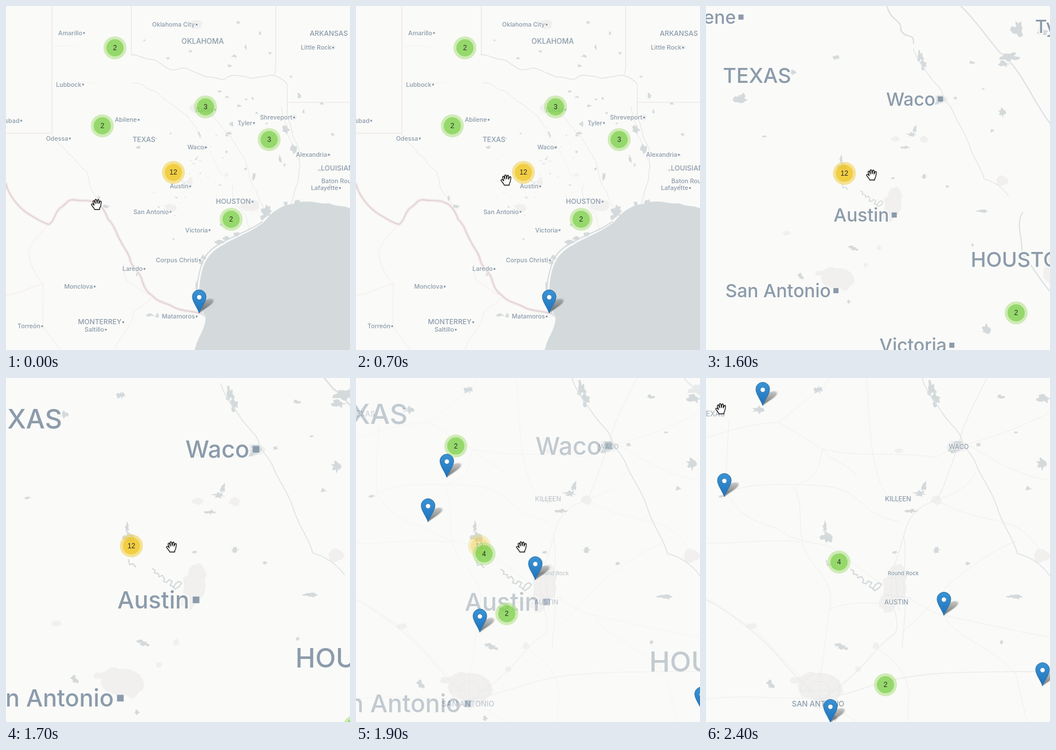
An HTML page that plays this animation: 600x600 px, repeating every 2500 ms.

```html
<!DOCTYPE html>
<html lang="en">
<head>
<meta charset="utf-8">
<title>Clustered map</title>
<style>
html, body { margin: 0; width: 100%; height: 100%; overflow: hidden; background: #fafaf8; }
svg { display: block; width: 100vw; height: 100vh; }
text { font-family: Inter, sans-serif; font-weight: 500; fill: #8b9bab; }
.halo text { paint-order: stroke; stroke: #fafaf8; stroke-width: 1.6px; stroke-linejoin: round; }
.count { font: 12px "Liberation Sans", Arial, sans-serif; fill: #2b2b2b; text-anchor: middle; }
.line { fill: none; stroke-linejoin: round; stroke-linecap: round; }
</style>
</head>
<body>
<svg viewBox="0 0 600 600">
  <defs>
    <linearGradient id="blue" x1="0" y1="0" x2="0" y2="1">
      <stop offset="0" stop-color="#3a94d4"/><stop offset="1" stop-color="#1f72bb"/>
    </linearGradient>
    <linearGradient id="shade" x1="0" y1="1" x2="0" y2="0">
      <stop offset="0" stop-color="#000" stop-opacity=".55"/><stop offset="1" stop-color="#000" stop-opacity=".2"/>
    </linearGradient>
    <filter id="soft" x="-30%" y="-30%" width="160%" height="160%"><feGaussianBlur stdDeviation="1.6"/></filter>
    <path id="drop" d="M0 0C-3-9-12-20-12-28.500A12 12 0 0 1 12-28.500C12-20 3-9 0 0Z"/>
    <g id="pin">
      <use href="#drop" transform="skewX(-38) scale(.8 .62)" fill="url(#shade)" filter="url(#soft)"/>
      <use href="#drop" fill="url(#blue)" stroke="#2a6ea6" stroke-width="1"/>
      <circle cy="-27.500" r="4.200" fill="#fff" stroke="#2a6ea6" stroke-width=".6"/>
    </g>
    <path id="open" fill="#fff" stroke="#111" stroke-width="1.350" stroke-linejoin="round" stroke-linecap="round"
      d="M-3.500 9C-4 6-8 3-9 .8C-9.300-1-7-1.600-5.500.2L-4.300 1.500L-6.300-4.500C-6.600-6.600-4.500-7.200-3.700-5.300L-2.200-1.500L-2.700-7.200C-2.700-9.300-.2-9.300.1-7.200L.8-1.800L1.600-7C2-8.900 4.300-8.600 4.200-6.500L4-1.300L5.700-4.900C6.600-6.500 8.600-5.700 8.100-3.800C7.300-.5 8 3.300 5.500 6.200L5.200 9Z"/>
    <path id="point" fill="#0a0a0a" stroke="#fff" stroke-width=".8" stroke-linejoin="round"
      d="M-4-8C-2.800-8.900-1.400-8-1.300-6.600L-.9-3C.5-4 1.700-3.500 2-2.400C3.300-3.100 4.500-2.500 4.700-1.400C6.300-2 7.500-1 7.400.6C7.300 3 6.700 4 6 5.300V8H-2.500V5.800L-7 1.800C-8.200.3-6.600-1.100-5.200-.2L-3.800.8L-4.600-6.300Z"/>
  </defs>
  <rect width="600" height="600" fill="#fafaf8"/>
  <g id="far"></g>
  <g id="near"></g>
  <polygon id="hull" points="264,199 278,203 342,321 327,355 293,368 246,269"
    fill="#3388ff" fill-opacity=".2" stroke="#3388ff" stroke-width="3" stroke-linejoin="round"/>
  <g id="marks"></g>
  <use id="cursor"/>
</svg>
<script>
const WATER = '#d4dadc', LAND = '#fafaf8', TOWN = '#f1f0ef';
const CX = 317.6, CY = 289.3, ZOOM = 4;
const $ = id => document.getElementById(id);

let seed = 11;
const rand = () => (seed = seed * 16807 % 2147483647) / 2147483647;

const line = (d, color, width) =>
  `<path class="line" d="${d}" stroke="${color}" stroke-width="${width}"/>`;

// Ragged outline around an ellipse
function blob(x, y, w, h, fill, low = .3) {
  const n = 16;
  let d = '';
  for (let i = 0; i < n; i++) {
    const a = i / n * Math.PI * 2, r = low + (1 - low) * rand();
    d += `${i ? 'L' : 'M'}${(x + Math.cos(a) * w / 2 * r).toFixed(1)} ${(y + Math.sin(a) * h / 2 * r).toFixed(1)}`;
  }
  return `<path d="${d}Z" fill="${fill}"/>`;
}
const blobs = (list, fill, low) =>
  list.trim().split(/\s+/).map(s => blob(...s.split(',').map(Number), fill, low)).join('');

// Lakes and towns shared by both zoom levels, in close-up coordinates
const towns = blobs(`195,538,84,60 180,530,50,40 215,545,50,50 328,365,44,78 335,345,34,50 318,392,34,40
  402,213,22,18 296,467,14,14 336,127,18,10 437,120,44,24 80,433,22,12 585,310,34,26 265,508,12,12
  335,212,24,14 155,528,18,14`, TOWN, .7);
const creek = 'M253 334l5 3-1 5 7 1 1 6 6-3 4 6-2 5 6 2 4-5 6 3-4 7 7 3 3-6 6-4 5 3-4 6-8 5-4-4M210 318l2 9 6-2 5 6';
const lakes = blobs(`196,20,18,20 93,56,28,18 392,18,24,36 400,38,18,30 440,118,32,22 432,127,26,12
  373,201,30,16 380,187,12,24 359,232,30,9 402,300,18,12 207,260,10,30 210,278,26,28 237,470,26,14 231,466,18,8
  112,535,18,20 540,381,36,12 586,150,26,30 516,461,9,9 590,36,34,20 514,33,20,9 562,193,12,10
  456,324,11,8 330,304,14,6 475,116,12,8 541,95,9,5 28,206,18,6 225,594,14,12`, WATER)
  + line(creek, WATER, 2.2)
  + line('M377 0C382 20 397 38 413 62S442 90 446 108C452 126 464 132 471 150C480 175 500 197 510 232C520 262 537 280 543 306C566 312 586 326 600 345', '#dfe3e5', 1.6);

const bigLabel = (name, x, y, size = 12.1) =>
  `<text x="${x}" y="${y + 4.3}" font-size="${size}" font-weight="600" text-anchor="middle">${name}</text>`;
const dot = (x, y) => `<rect x="${x - 1.5}" y="${y - 1.5}" width="3" height="3" fill="#8b9bab"/>`;
const city = (name, x, y, size = 10.7) =>
  `<text x="${x - 3}" y="${y + 3.8}" font-size="${size}" text-anchor="end">${name}</text>` + dot(x, y);

function farMap() {
  const pink = '#efdddd', river = '#dde1e3';
  const rio = 'M0 310C4 328 18 347 35 360C50 369 62 378 75 381C86 374 84 360 95 352C106 346 106 337 118 338C132 341 145 337 155 343C168 347 174 360 178 372C190 382 192 398 200 410C206 424 216 432 217 445C222 459 232 463 236 474C240 488 243 497 256 506C266 518 283 518 294 526C310 534 328 531 345 538';
  const coast = 'M600 353C589 347 577 351 564 344C549 346 540 341 524 341C508 341 499 347 488 347C474 354 466 358 456 370C447 380 438 384 425 393C406 402 394 405 380 416C362 425 352 436 346 450C340 464 337 482 337 500C337 516 341 530 348 544C348 560 338 574 333 587L329 600';
  return blobs('350,178,34,26 328,178,18,20 425,347,38,28 332,32,24,20 570,72,14,10 502,194,14,12 563,260,10,8', TOWN, .7)
    + line('M65 485L64 560L95 600M75 381C60 396 46 410 39 428C42 450 50 470 65 485M205 450C211 462 200 473 214 481C228 488 236 500 256 506M190 600C196 575 222 560 222 535C236 520 246 522 256 506M0 505C30 500 40 490 65 485', '#f5e9e8', 1)
    + line('M80 0V222H0', pink, 1)
    + line('M218.500 0V85M470.500 0V110L468 119M490.500 136V168H600', '#e7e1e2', 1)
    + line('M218 85C229 84 240 92 250 93C264 91 272 106 287 111C300 114 305 104 317 110C330 116 339 119 350 124C363 121 372 131 383 127C394 116 406 123 418 123C432 130 440 122 452 123C462 117 480 123 490 136', '#dfdfe1', 1.2)
    + line('M490.500 168V195C500 209 497 226 507 240C515 254 509 267 513 279C509 291 513 302 506 315C501 329 502 337 496 347', '#dfdfe1', 1)
    + line('M80 224C88 240 101 244 108 257C124 266 124 280 139 287C148 302 142 318 157 331L168 346', river, .8)
    + line('M222 135C237 131 243 145 255 147C266 149 274 164 286 169C298 177 305 184 317 192C319 201 326 200 325 206C328 212 333 207 332.500 214', river, .8)
    + line('M396.500 313C392 321 397 328 396 337C405 348 410 359 418 364C421 377 423 386 425 393M345 182C363 190 370 204 383 219C396 229 402 247 412 260C427 282 420 306 437 323C441 340 448 346 451 357', river, .7)
    + line('M480 176C482 197 492 210 491 224C499 240 508 253 509 267', river, .8)
    + line('M110 133C127 131 146 137 160 132M80 70C100 72 114 66 130 73', '#eef0ef', .7)
    + blobs(`394,206,10,12 389,222,14,8 231,246,10,7 375,382,6,9 408,207,8,5 430,161,7,6 405,28,10,8 376,57,7,6 398,87,12,8
      390,104,14,6 418,72,6,12 443,48,8,10 461,82,9,7 497,123,8,4 372,149,10,7 386,159,11,5 406,174,10,7 419,163,8,5
      437,187,9,6 488,215,16,20 501,248,14,22 478,268,8,18 486,277,6,10 432,297,8,16 418,284,7,7 455,205,7,4`, WATER)
    + blobs(`322,79,8,6 282,91,9,6 241,60,6,4 292,407,5,5 175,350,14,12 162,336,6,14 228,468,6,9 251,539,22,6
      551,170,10,6 512,156,9,14 570,224,9,7 547,286,10,6 565,313,8,7 519,184,6,9 264,540,8,14`, WATER)
    + `<g transform="translate(${CX * .75} ${CY * .75}) scale(.25)">${towns}${lakes}</g>`
    + line(rio, '#f3e7e7', 5) + line(rio, '#ddd0d3', 1.4)
    + `<path d="${coast}H600Z" fill="${WATER}"/>`
    + blobs('454,358,22,26 448,368,14,12 488,344,10,8 372,412,22,10 385,405,16,9 402,398,14,9 345,439,14,10 340,448,10,10 332,488,5,20 508,341,14,8', WATER, .5)
    + line('M447 376C430 390 400 399 378 412C360 421 349 431 343 446C337 462 333 482 333 500C334 516 338 530 345 541', WATER, 2)
    + line('M452 374C434 390 406 401 381 414C364 422 352 434 345 449C339 464 335 482 335.500 500C336 516 340 530 347 543', LAND, 1.1)
    + '<g class="halo">'
    + bigLabel('OKLAHOMA', 343, 62, 12.6) + bigLabel('ARKANSAS', 563, 48) + bigLabel('TEXAS', 240.7, 232.8) + bigLabel('LOUISIANA', 582, 283)
    + city('HOUSTON', 430, 341.3, 12.1) + city('MONTERREY', 204.500, 551.500, 12.1)
    + [['Amarillo', 136, 47], ['Oklahoma City', 332.500, 32.500], ['Little Rock', 570.500, 72.500], ['Lubbock', 134.500, 137],
       ['Abilene', 231.300, 198.500], ['Dallas', 365, 181], ['Shreveport', 502.500, 194.500], ['Tyler', 432.500, 204],
       ['Carlsbad', 26.500, 200], ['Odessa', 111.300, 231], ['Waco', 348.300, 246.600], ['Alexandria', 563, 259.500],
       ['Austin', 321.200, 314.600], ['Baton Rouge', 618, 305.500], ['Lafayette', 582.500, 317.500], ['San Antonio', 287, 359],
       ['Victoria', 355, 391], ['Corpus Christi', 338, 443.300], ['Laredo', 241.500, 458.500], ['Monclova', 154.500, 489.300],
       ['Torreón', 63, 558.500], ['Saltillo', 174, 564.500], ['Matamoros', 332.500, 541.500]].map(c => city(...c)).join('')
    + '</g>';
}

function nearMap() {
  const minor = `M0 104C50 90 70 82 125 77C160 55 165 42 205 16L214 0M125 77C160 95 180 112 204 124C222 150 250 148 262 172
    M40 75C38 120 34 150 36 200C60 240 80 250 125 262C150 285 185 286 214 293M36 200C75 184 110 185 160 186S240 190 262 210S300 245 336 250
    M0 288C50 290 100 280 165 286M155 190C175 240 152 270 182 318C205 345 225 370 215 404L200 520M0 386C30 395 52 424 80 433C110 462 140 500 190 545
    M204 124C270 140 330 128 400 138L438 120M204 124C196 145 204 170 160 186M280 0C284 60 286 130 300 172S320 205 336 212
    M438 120C470 110 510 105 600 60M445 112C490 130 530 170 600 178M471 165C450 200 420 205 402 213
    M403 213C440 236 470 240 520 252S570 300 600 310M415 414C470 425 530 440 600 452M355 385C380 400 395 410 415 414
    M345 440C375 420 400 380 430 355S500 300 540 285M214 293C245 310 280 345 318 365M215 404C250 388 290 392 318 395
    M0 560C60 552 120 560 180 558M205 565C230 580 250 590 262 600M415 414C430 450 500 470 540 515L560 600M296 467C320 490 340 500 350 530S345 580 355 600`;
  const major = 'M490 0C470 40 448 80 440 118C428 150 418 185 403 213C380 220 354 232 345 275C336 310 324 330 322 370C326 410 340 425 330 445C310 460 300 470 288 485C262 515 235 540 200 560M200 560C250 552 280 538 312 530C370 514 430 512 600 512M0 386C60 420 105 460 130 490S170 535 200 560M345 275C352 320 340 350 348 400L342 470';
  const ring = 'M165 545A34 30 0 1 0 233 545A34 30 0 1 0 165 545M180 545A18 16 0 1 0 216 545A18 16 0 1 0 180 545M198 512V580M165 545H233M318 350L348 344M312 378L358 384M330 340L336 405';
  const label = (name, x, y, size, weight = 500) =>
    `<text x="${x}" y="${y + size * .36}" font-size="${size}" style="font-weight:${weight}" text-anchor="middle">${name}</text>`;
  return `<rect width="600" height="600" fill="${LAND}"/>` + towns
    + line(minor, '#eff0ef', 1) + line(major, '#e9ebeb', 1.3) + line(ring, '#e6e8e8', 1) + lakes
    + '<g class="halo">'
    + `<text x="33" y="66.500" font-size="12.500" text-anchor="end" opacity=".75">TEXAS</text>`
    + label('WACO', 441, 119.500, 11.2) + label('KILLEEN', 335, 211, 11.2) + label('Round Rock', 344, 341, 9.500)
    + label('AUSTIN', 332, 391, 11.2) + label('SAN ANTONIO', 195.500, 568.500, 13) + '</g>';
}

function cluster(x, y, n, alpha = 1) {
  const [outer, inner] = n < 10 ? ['181,226,140', '110,204,57'] : ['241,211,87', '240,194,12'];
  return `<g transform="translate(${x} ${y})" opacity="${alpha}"><circle r="20" fill="rgba(${outer},.6)"/>`
    + `<circle r="15" fill="rgba(${inner},.6)"/><text class="count" y="4.200">${n}</text></g>`;
}
const pin = (x, y) => `<use href="#pin" x="${x}" y="${y}"/>`;

// Cubic Bezier easing that starts at a slope of zero handle length: (0,0,x2,1)
function ease(p, x2) {
  if (p <= 0) return 0;
  if (p >= 1) return 1;
  let lo = 0, hi = 1;
  for (let i = 0; i < 30; i++) {
    const u = (lo + hi) / 2;
    if (3 * x2 * u * u * (1 - u) + u ** 3 < p) lo = u; else hi = u;
  }
  return lo * lo * (3 - 2 * lo);
}

const groups = [[190, 73, 2], [348, 176, 3], [168, 209, 2], [459, 233, 3], [292, 290.200, 12], [392.700, 372, 2]];
// Final place, count (0 is a pin) and index of the parent group
const parts = [[131, -64, 2, 4], [99, 48, 0, 4], [32, 207, 0, 4], [415, 414, 0, 4], [217, 601, 0, 4],
  [232, 321, 4, 4], [313, 535, 2, 4], [587, 537, 0, 5]];

// time, x, y, shape
const path = [[0, 158, 346, 'open'], [400, 168, 342, 'open'], [500, 200, 329, 'open'], [600, 236, 314, 'open'],
  [700, 262, 303.500, 'open'], [800, 282, 301, 'point'], [900, 296, 309, 'point'], [1000, 287.500, 294, 'point'],
  [1600, 289, 294.500, 'open'], [2300, 142, 160, 'open'], [2400, 26, 53.500, 'open']];

function marks(t, k) {
  const at = ([x, y]) => [CX + (x - CX) * k, CY + (y - CY) * k];
  if (t < 1800) {
    return groups.map(g => cluster(...at(g), g[2])).join('') + pin(...at([337, 535.500]));
  }
  const p = ease((t - 1800) / 300, .58);
  const old = groups.slice(4).map(g => cluster(...at(g), g[2], 1 - p)).join('');
  if (!p) return old;
  return old + parts.map(([x, y, n, from]) => {
    const [ox, oy] = at(groups[from]);
    const px = ox + (x - ox) * p, py = oy + (y - oy) * p;
    return n ? cluster(px, py, n) : pin(px, py);
  }).join('');
}

function draw(t) {
  const k = 1 + (ZOOM - 1) * ease((t - 1517) / 250, .25) * (t >= 1600);
  const fade = Math.min(1, Math.max(0, (t - 1800) / 200));
  $('far').setAttribute('transform', `translate(${CX * (1 - k)} ${CY * (1 - k)}) scale(${k})`);
  $('far').style.display = fade < 1 ? '' : 'none';
  $('near').setAttribute('opacity', fade);
  $('hull').style.display = t >= 800 && t < 1600 ? '' : 'none';
  $('marks').innerHTML = marks(t, k);
  const [, x, y, shape] = path.filter(c => c[0] <= t).pop();
  $('cursor').setAttribute('href', '#' + shape);
  $('cursor').setAttribute('transform', `translate(${x} ${y})`);
}

$('far').innerHTML = farMap();
$('near').innerHTML = nearMap();

const STEP = 100, LOOP = 2500, start = performance.now();
let last = -1;
function tick() {
  const t = Math.floor((performance.now() - start) % LOOP / STEP) * STEP;
  if (t !== last) draw(last = t);
  requestAnimationFrame(tick);
}
tick();
</script>
</body>
</html>
```
